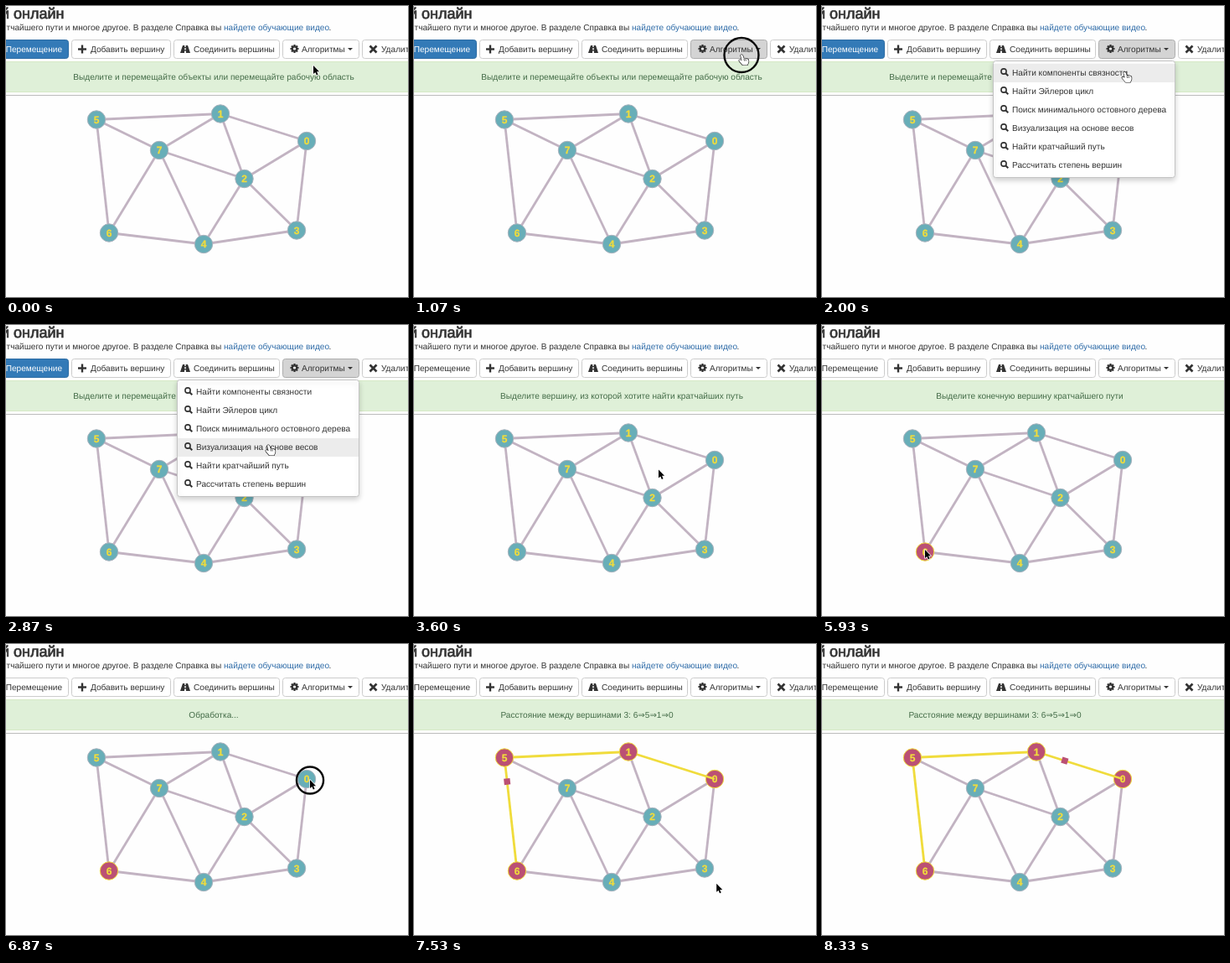
An HTML page with a canvas for the animation above (8.39 s loop, 480 px wide and 347 px high).

```html
<!DOCTYPE html>
<html lang="ru">
<head>
<meta charset="utf-8">
<title>Кратчайший путь</title>
<style>
html, body { margin: 0; width: 100%; height: 100%; overflow: hidden; background: #fefefe; }
canvas { display: block; }
</style>
</head>
<body>
<canvas id="stage" width="480" height="347"></canvas>
<script>
const ctx = document.getElementById('stage').getContext('2d');
const LOOP = 8390, FPS = 15;
const FONT = '"Liberation Sans", Arial, sans-serif';
const BODY = '10.1px';
const INK = '#333', TEAL = '#68aeb8', RED = '#bb5074', YELLOW = '#f0dc3c', MAUVE = '#c2b3c2', RIM = '#a8b2bd';

const nodes = [[359, 161], [256, 128.5], [284.5, 206], [347, 267.5], [236, 284], [108, 135.5], [123, 270.5], [183, 172]];
const edges = ['51', '57', '56', '71', '76', '74', '72', '12', '10', '02', '03', '23', '24', '64', '43'];
const route = [6, 5, 1, 0];
const menu = ['Найти компоненты связности', 'Найти Эйлеров цикл', 'Поиск минимального остовного дерева',
  'Визуализация на основе весов', 'Найти кратчайший путь', 'Рассчитать степень вершин'];

const MENU_OPEN = 1190, MENU_PICK = 3460, START_PICK = 5520, END_PICK = 6855, RESULT = 7060, PULSE = 7130;
const clicks = [[930, 1200], [3330, 3530], [5380, 5620], [6700, 6945]];
// time, x, y of the pointer tip
const pointer = [
  [0, 367, 71], [400, 374, 69], [800, 391, 58], [1750, 391, 58], [2130, 350, 86], [2530, 318, 122],
  [2600, 318, 122], [2870, 313, 143], [3050, 313, 144], [3270, 296, 166], [3560, 292, 172], [3800, 292, 178],
  [4000, 292, 178], [4130, 302, 170.5], [4480, 302, 170.5], [5200, 123, 268], [5960, 123, 268],
  [6700, 363, 162], [6960, 363, 162], [7670, 361, 299], [8000, 361, 362]
];

const ease = u => u * u * (3 - 2 * u);

function pointerAt(t) {
  const i = pointer.findIndex(k => k[0] > t);
  if (i < 0) return pointer[pointer.length - 1].slice(1);
  const [t0, x0, y0] = pointer[i - 1], [t1, x1, y1] = pointer[i];
  const u = ease((t - t0) / (t1 - t0));
  return [x0 + (x1 - x0) * u, y0 + (y1 - y0) * u];
}

function text(s, x, y, color = INK, font = BODY, align = 'left', weight = 0) {
  ctx.font = `${font} ${FONT}`;
  ctx.textRendering = 'geometricPrecision';
  ctx.textAlign = align;
  ctx.fillStyle = color;
  ctx.fillText(s, x, y);
  if (weight) {
    ctx.strokeStyle = color;
    ctx.lineWidth = weight;
    ctx.strokeText(s, x, y);
  }
}

function box(x, y, w, h, fill, stroke, r = 3) {
  ctx.beginPath();
  ctx.roundRect(x + .5, y + .5, w - 1, h - 1, r);
  ctx.fillStyle = fill;
  ctx.fill();
  ctx.strokeStyle = stroke;
  ctx.lineWidth = 1;
  ctx.stroke();
}

function line(points, color, width) {
  ctx.beginPath();
  points.forEach(p => ctx.lineTo(p[0], p[1]));
  ctx.strokeStyle = color;
  ctx.lineWidth = width;
  ctx.stroke();
}

function polygon(points, fill) {
  ctx.beginPath();
  points.forEach(p => ctx.lineTo(p[0], p[1]));
  ctx.closePath();
  ctx.fillStyle = fill;
  ctx.fill();
}

function circle(x, y, r) {
  ctx.beginPath();
  ctx.arc(x, y, r, 0, 2 * Math.PI);
}

function roadIcon(x, y) {
  polygon([[x + 3, y], [x + 9, y], [x + 12, y + 9], [x, y + 9]], INK);
  ctx.fillStyle = '#fff';
  ctx.fillRect(x + 5.3, y, 1.4, 2);
  ctx.fillRect(x + 5.2, y + 3.2, 1.6, 2);
  ctx.fillRect(x + 5, y + 6.6, 2, 2.4);
}

function gearIcon(x, y) {
  for (let i = 0; i < 4; i++) {
    const a = i * Math.PI / 4, dx = 5 * Math.cos(a), dy = 5 * Math.sin(a);
    line([[x - dx, y - dy], [x + dx, y + dy]], INK, 2.2);
  }
  circle(x, y, 2.7);
  ctx.fillStyle = '#fff';
  ctx.fill();
  ctx.strokeStyle = INK;
  ctx.lineWidth = 2.2;
  ctx.stroke();
}

function lensIcon(x, y) {
  circle(x, y, 3.1);
  ctx.strokeStyle = INK;
  ctx.lineWidth = 1.6;
  ctx.stroke();
  line([[x + 2.2, y + 2.2], [x + 5.3, y + 5.3]], INK, 2);
}

function drawHeader(t, x, y) {
  text('й онлайн', 69.5, 14.7, INK, '18px', 'right', .7);
  text('тчайшего пути и многое другое. В разделе Справка вы ', 260, 29, INK, BODY, 'right');
  text('найдете обучающие видео', 260, 29, '#2f6ca8');
  text('.', 385.5, 29);

  const moving = t < MENU_PICK;
  box(-20, 40, 95, 23, moving ? '#337ab7' : '#fff', moving ? '#2e6da4' : '#ccc');
  text('Перемещение', 67, 55, moving ? '#fff' : INK, BODY, 'right');

  box(78, 40, 119, 23, '#fff', '#ccc');
  line([[86, 51.5], [96, 51.5]], INK, 2.4);
  line([[91, 46.5], [91, 56.5]], INK, 2.4);
  text('Добавить вершину', 101, 55);

  box(200, 40, 127, 23, '#fff', '#ccc');
  roadIcon(208, 47);
  text('Соединить вершины', 224, 55);

  const pressed = t > clicks[0][0] && moving;
  const hovered = x > 330 && x < 421 && y > 40 && y < 63;
  box(330, 40, 92, 23, pressed ? '#d4d4d4' : hovered ? '#e6e6e6' : '#fff', pressed || hovered ? '#adadad' : '#ccc');
  gearIcon(344.5, 51);
  text('Алгоритмы', 353, 55);
  polygon([[408, 50], [414, 50], [411, 53]], INK);

  box(425, 40, 100, 23, '#fff', '#ccc');
  line([[434.5, 47.5], [442.5, 55.5]], INK, 2.6);
  line([[442.5, 47.5], [434.5, 55.5]], INK, 2.6);
  text('Удалить', 448, 55);
}

function drawMessage(t) {
  box(-5, 66, 490, 37, '#dff0d8', '#d6e9c6', 0);
  let message = 'Выделите и перемещайте объекты или перемещайте рабочую область';
  if (t >= MENU_PICK) message = 'Выделите вершину, из которой хотите найти кратчайших путь';
  if (t >= START_PICK) message = 'Выделите конечную вершину кратчайшего пути';
  if (t >= END_PICK) message = 'Обработка...';
  if (t >= RESULT) message = 'Расстояние между вершинами 3: 6⇒5⇒1⇒0';
  text(message, t >= RESULT ? 206.5 : 248, 88.3, '#436b47', BODY, 'center');
  ctx.fillStyle = '#bcbcbc';
  ctx.fillRect(0, 106, 480, 1);
}

function drawPulse(distance) {
  for (let i = 0; i < route.length - 1; i++) {
    const [x0, y0] = nodes[route[i]], [x1, y1] = nodes[route[i + 1]];
    const length = Math.hypot(x1 - x0, y1 - y0);
    if (distance <= length) {
      const u = distance / length;
      ctx.save();
      ctx.translate(x0 + (x1 - x0) * u, y0 + (y1 - y0) * u);
      ctx.rotate(Math.atan2(y1 - y0, x1 - x0));
      ctx.fillStyle = RED;
      ctx.fillRect(-3.7, -3.7, 7.4, 7.4);
      ctx.restore();
      return;
    }
    distance -= length;
  }
}

function drawGraph(t) {
  const done = t >= RESULT;
  const onRoute = ([a, b]) => Math.abs(route.indexOf(+a) - route.indexOf(+b)) === 1
    && route.includes(+a) && route.includes(+b);
  for (const e of edges)
    line([nodes[e[0]], nodes[e[1]]], done && onRoute(e) ? YELLOW : MAUVE, 2.8);
  if (t >= PULSE) drawPulse((t - PULSE) * .2655);
  nodes.forEach(([x, y], i) => {
    const selected = done ? route.includes(i) : i === 6 && t >= START_PICK;
    circle(x, y, 10.7);
    ctx.fillStyle = selected ? RED : TEAL;
    ctx.fill();
    ctx.strokeStyle = selected ? YELLOW : RIM;
    ctx.lineWidth = 1;
    ctx.stroke();
    text(i, x, y + 4.2, YELLOW, 'bold 12px', 'center', .3);
  });
  if (done) line([[348.5, 157.7], nodes[0]], YELLOW, 2.4);
}

function drawMenu(x, y) {
  ctx.save();
  ctx.shadowColor = 'rgba(0,0,0,.18)';
  ctx.shadowBlur = 6;
  ctx.shadowOffsetY = 3;
  box(204, 65, 218, 140, '#fff', '#c4c4c4');
  ctx.restore();
  menu.forEach((label, i) => {
    const top = 69 + 22 * i;
    if (x > 204 && x < 421 && y >= top && y < top + 22) {
      ctx.fillStyle = '#ececec';
      ctx.fillRect(205, top, 216, 22);
    }
    lensIcon(217, top + 9);
    text(label, 227, top + 14);
  });
}

function drawPointer(x, y, hand) {
  ctx.save();
  ctx.translate(x, y);
  if (!hand) ctx.scale(.88, .92);
  ctx.lineJoin = 'round';
  const shape = new Path2D(hand
    ? 'M-1 1Q0-1 1.5 1L3 5Q4 3.5 5 5Q6.5 4 7 5.5Q8.5 5 8.5 7V9L7 12.5H1.5L-2.5 8Q-3.5 6.5-2 6L.5 7Z'
    : 'M0 0V11L2.6 8.7L4.4 12.6L6.3 11.8L4.6 8H8Z');
  ctx.strokeStyle = hand ? '#111' : '#fff';
  ctx.lineWidth = hand ? 1.2 : 1.6;
  ctx.fillStyle = hand ? '#fff' : '#000';
  ctx.stroke(shape);
  ctx.fill(shape);
  if (hand) {
    line([[3, 5], [3.5, 7.5]], '#111', .7);
    line([[5, 5.2], [5.3, 7.5]], '#111', .7);
  }
  ctx.restore();
}

function draw(t) {
  const [x, y] = pointerAt(t);
  const open = t >= MENU_OPEN && t < MENU_PICK;
  ctx.fillStyle = '#fefefe';
  ctx.fillRect(0, 0, 480, 347);
  drawHeader(t, x, y);
  drawMessage(t);
  drawGraph(t);
  if (open) drawMenu(x, y);
  const overButton = y < 63 && x > 330;
  const overItem = open && y > 69 && y < 201;
  drawPointer(x, y, overButton || overItem);
  for (const [start, end] of clicks) {
    if (t <= start || t >= end) continue;
    circle(x, y + .5, 20.5 * Math.min(1, (t - start) / 100, (end - t) / 100));
    ctx.strokeStyle = '#0a0a0a';
    ctx.lineWidth = 2.4;
    ctx.stroke();
  }
}

const began = performance.now();
function tick() {
  const t = (performance.now() - began) % LOOP;
  draw(Math.floor((t + 5) * FPS / 1000) * 1000 / FPS);
  requestAnimationFrame(tick);
}
tick();
</script>
</body>
</html>
```
